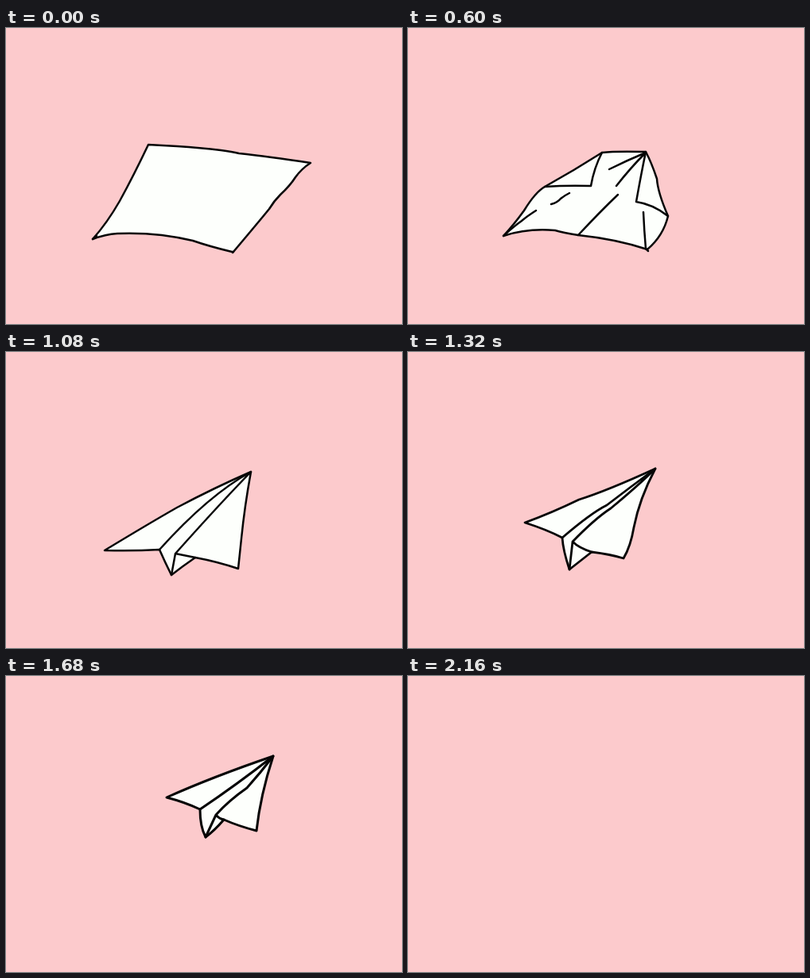
These frames come from a looping animation (498x373 px, 2.28 s). An HTML page with a canvas:

```html
<!DOCTYPE html>
<html lang="en">
<head>
<meta charset="utf-8">
<title>Paper plane</title>
<style>
html, body { margin: 0; width: 100%; height: 100%; overflow: hidden; background: #fccacc; }
canvas { display: block; }
</style>
</head>
<body>
<canvas id="stage" width="498" height="373"></canvas>
<script>
const ctx = document.getElementById('stage').getContext('2d');
const STEP = 120, LOOP = 2280;

// Each drawing: filled outline, then open pen strokes.
const art = {
  sheet: ['M179 147L215 149Q245 151 270 154Q285 156 293 158Q330 162 383 170Q372 177 364 188Q357 199 345 210Q337 218 331 228Q318 244 286 282L284 282Q255 275 235 268Q190 257 140 259Q125 260 109 266Q127 246 143 218Q160 187 179 147Z',
    'M285 283L286 282M109 266L114 262'],
  cornersSmall: ['M112 264Q132 240 146 215L164 180L212 149Q270 152 345 163L357 199Q336 222 326 235L292 281Q255 271 235 266Q155 249 112 264Z',
    'M164 180L204 180L212 149M345 163L335 190L357 199'],
  cornersLarge: ['M116 263Q135 239 148 219L167 192L230 154Q270 154 320 160L341 216Q326 242 297 280Q255 268 225 264Q160 249 116 263Z',
    'M167 192Q190 190 219 192L230 154M320 160L308 206Q327 207 341 216M298 165L266 203M258 213L220 260'],
  cornersDone: ['M120 262Q133 248 146 230Q160 207 172 200Q208 180 244 157Q260 155 299 156Q306 169 313 190Q314 207 327 237Q321 262 301 279Q262 266 214 261Q195 258 185 255Q150 252 120 262Z',
    'M172 200Q200 198 230 199Q234 176 244 157M299 156Q293 185 287 219Q308 222 327 237M299 157Q275 167 253 178M298 158Q280 176 262 199M264 210Q243 230 214 261M203 208Q197 211 192 215Q188 220 180 222M161 230Q150 237 143 243Q133 250 120 262M296 232Q297 255 299 278L302 281'],
  narrowing: ['M120 260Q148 232 178 212Q225 181 279 156L303 154Q309 190 316 238Q312 263 301 278Q265 264 213 263Q200 256 187 253Q150 254 120 260Z',
    'M303 154Q260 174 236 203L182 212M222 217L190 252M303 154Q265 190 213 262M303 154Q294 184 286 211L316 238M282 218L260 263'],
  dart: ['M121 258Q190 213 216 198Q260 173 307 152Q304 190 301 210L301 278Q293 279 289 277Q275 272 262 262Q245 260 236 261Q222 266 209 265Q205 256 191 250Q160 255 121 258Z',
    'M307 152Q255 180 232 209M217 219Q205 230 191 250M307 152Q275 185 248 212Q230 235 211 263M307 153Q285 180 276 202Q252 222 218 259L236 261M307 152Q299 180 287 204M282 213Q270 240 256 261'],
  keelStart: ['M124 250Q180 216 215 196Q262 171 308 151Q300 195 296 235L292 273Q265 264 238 259Q222 270 208 281Q200 265 193 249Q160 251 124 250Z',
    'M308 151Q255 180 193 249M308 151Q270 190 213 254L208 281M213 254L238 259'],
  keelDown: ['M130 237Q180 213 215 193Q260 170 309 149Q296 190 291 225Q288 250 283 268Q255 260 233 256L206 289Q197 265 195 246Q165 240 130 237Z',
    'M195 246Q245 196 309 149M210 249Q254 199 309 149M210 249L206 289M210 249L233 256'],
  plane: ['M147 215Q180 203 215 186Q250 175 311 147Q291 185 284 221Q280 245 271 260Q255 255 231 252L203 274Q195 250 194 234Q175 224 147 215Z',
    'M194 234Q230 203 250 193Q280 170 311 147M207 239Q235 210 255 197Q290 168 311 147M207 239L203 274M207 239Q215 247 231 252'],
  glider: ['M202 153Q260 127 336 101Q320 150 315 195Q292 189 274 181Q262 195 251 203Q244 190 244 168Q225 159 202 153Z',
    'M244 168Q290 137 336 101M264 175Q280 157 303 141Q320 122 336 101M264 175L251 203M264 175Q268 180 274 181']
};

const shift = (x, y) => new DOMMatrix([1, 0, 0, 1, x, y]);
// Scale about the nose and put the nose at x, y.
const nose = (fromX, fromY, x, y, sx, sy = sx) =>
  new DOMMatrix([sx, 0, 0, sy, x - fromX * sx, y - fromY * sy]);
const fly = (x, y, sx, sy) => nose(336, 101, x, y, sx, sy);

// One pose per step: drawing, placement, pen width.
const poses = [
  ['sheet'],
  ['sheet', shift(1, -1)],
  ['sheet', shift(2, -1.5)],
  ['cornersSmall'],
  ['cornersLarge'],
  ['cornersDone'],
  ['narrowing'],
  ['dart'],
  ['dart', shift(-1, 1)],
  ['keelStart'],
  ['keelDown'],
  ['plane', shift(0, 0), 2.8],
  ['plane', nose(311, 147, 318, 133, .94), 2.8],
  ['glider', fly(327, 117, 1.07), 2.9],
  ['glider', fly(336, 101, 1), 3],
  ['glider', fly(351, 87, .67, .54), 2.7],
  ['glider', fly(364, 54, .43, .38), 2.2],
  ['glider', fly(373, 24, .25), 1.8],
  []
];

function place(d, matrix) {
  const path = new Path2D();
  path.addPath(new Path2D(d), matrix);
  return path;
}

function draw(now) {
  const [name, matrix = shift(0, 0), pen = 2.5] = poses[Math.floor(now % LOOP / STEP)];
  ctx.fillStyle = '#fccacc';
  ctx.fillRect(0, 0, 498, 373);
  if (name) {
    const [outline, strokes] = art[name].map(d => place(d, matrix));
    ctx.fillStyle = '#fdfffc';
    ctx.strokeStyle = '#050505';
    ctx.lineWidth = pen;
    ctx.lineCap = ctx.lineJoin = 'round';
    ctx.fill(outline);
    ctx.stroke(outline);
    ctx.stroke(strokes);
  }
}

const start = performance.now();
function tick() {
  draw(performance.now() - start);
  requestAnimationFrame(tick);
}
tick();
</script>
</body>
</html>
```
